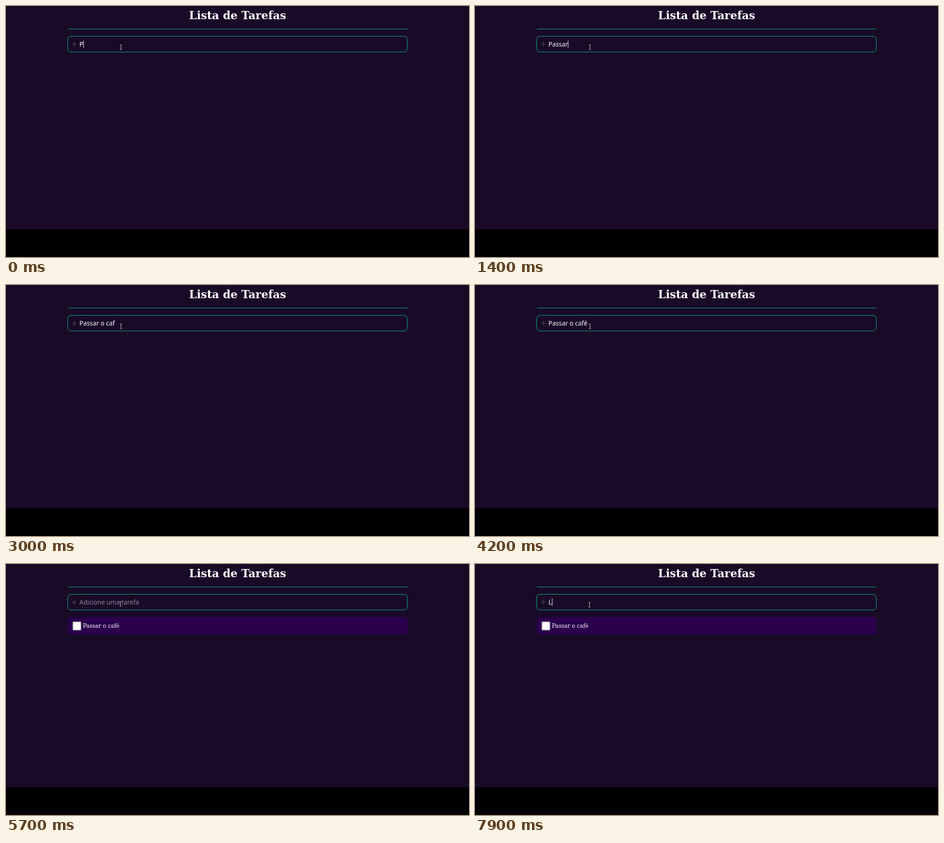
Write an HTML page that moves like this. It is 1017 px wide and 551 px high and loops after 8 s.

```html
<!DOCTYPE html>
<html lang="pt">
<head>
<meta charset="utf-8">
<title>Lista de Tarefas</title>
<style>
  html, body { margin: 0; width: 100%; height: 100%; overflow: hidden; background: #000; }
  svg { display: block; }
  text { white-space: pre; }
  .title { font: bold 24px "DejaVu Serif", serif; fill: #fff; text-anchor: middle; }
  .label { font: 12px "DejaVu Serif", serif; fill: #fff; }
  .entry { font: 13.85px "Noto Sans", "Open Sans", sans-serif; fill: #fff; }
  .entry.hint { fill: #8f8996; }
  .crisp { shape-rendering: crispEdges; }
</style>
</head>
<body>
<svg width="1017" height="551" viewBox="0 0 1017 551">
  <rect width="1017" height="490" fill="#190b28"/>
  <text class="title" x="508.7" y="29">Lista de Tarefas</text>
  <rect class="crisp" x="136" y="50" width="746" height="1" fill="#04c07b"/>
  <rect x="135.5" y="66.5" width="746" height="34.5" rx="7.5" fill="none" stroke="#04c07b"/>
  <path d="M144.5 84H155.5M150 78.5V89.5" stroke="#38353c" stroke-width="2.2"/>
  <text class="entry" id="entry" x="161.3" y="89"></text>
  <rect class="crisp" id="caret" y="76" width="1" height="16" fill="#fff"/>
  <g id="item">
    <rect x="135.5" y="116.5" width="746.5" height="38.5" rx="7" fill="#2b004d"/>
    <rect x="146.75" y="126.75" width="18" height="18.5" rx="2" fill="#fff" stroke="#7d7884" stroke-width="1.5"/>
    <text class="label" x="169" y="140">Passar o café</text>
  </g>
  <path id="mouse" d="M-2 .5H-.5M.5 .5H2M0 .5V10.5M-2 10.5H-.5M.5 10.5H2" fill="none" stroke="#d8d5dc"/>
</svg>
<script>
  const LOOP = 8000;
  const HINT = "Adicione uma tarefa";
  const TASK = "Passar o café";

  // [time, typed text, caret x or 0 when hidden]
  const typing = [
    [0, "P", 170],
    [300, "Pa", 177],
    [500, "Pas", 184],
    [700, "Pass", 191],
    [800, "Passa", 198],
    [1400, "Passar", 204],
    [1800, "Passar", 0],
    [2100, "Passar o", 216],
    [2300, "Passar o ", 219],
    [2500, "Passar o c", 226],
    [2800, "Passar o ca", 234],
    [3000, "Passar o caf", 0],
    [4000, TASK, 247],
    [4200, TASK, 0],
    [4700, "", 161],
    [5500, "", 0],
    [6500, "", 161],
    [7900, "L", 169]
  ];

  // [time, x, top]
  const pointer = [
    [0, 252.5, 85],
    [5700, 251.5, 82],
    [6000, 251.5, 84]
  ];

  const [entry, caret, item, mouse] =
    ["entry", "caret", "item", "mouse"].map(id => document.getElementById(id));

  const stepAt = (steps, t) => steps.filter(step => step[0] <= t).pop();
  const show = (el, on) => el.setAttribute("visibility", on ? "visible" : "hidden");

  function draw(t) {
    const [, typed, caretX] = stepAt(typing, t);
    const [, x, y] = stepAt(pointer, t);
    entry.textContent = typed || HINT;
    entry.classList.toggle("hint", !typed);
    caret.setAttribute("x", caretX);
    show(caret, caretX > 0);
    show(item, t >= 4700);
    mouse.setAttribute("transform", `translate(${x} ${y})`);
  }

  const start = performance.now();
  function tick() {
    draw((performance.now() - start) % LOOP);
    requestAnimationFrame(tick);
  }
  tick();
</script>
</body>
</html>
```
